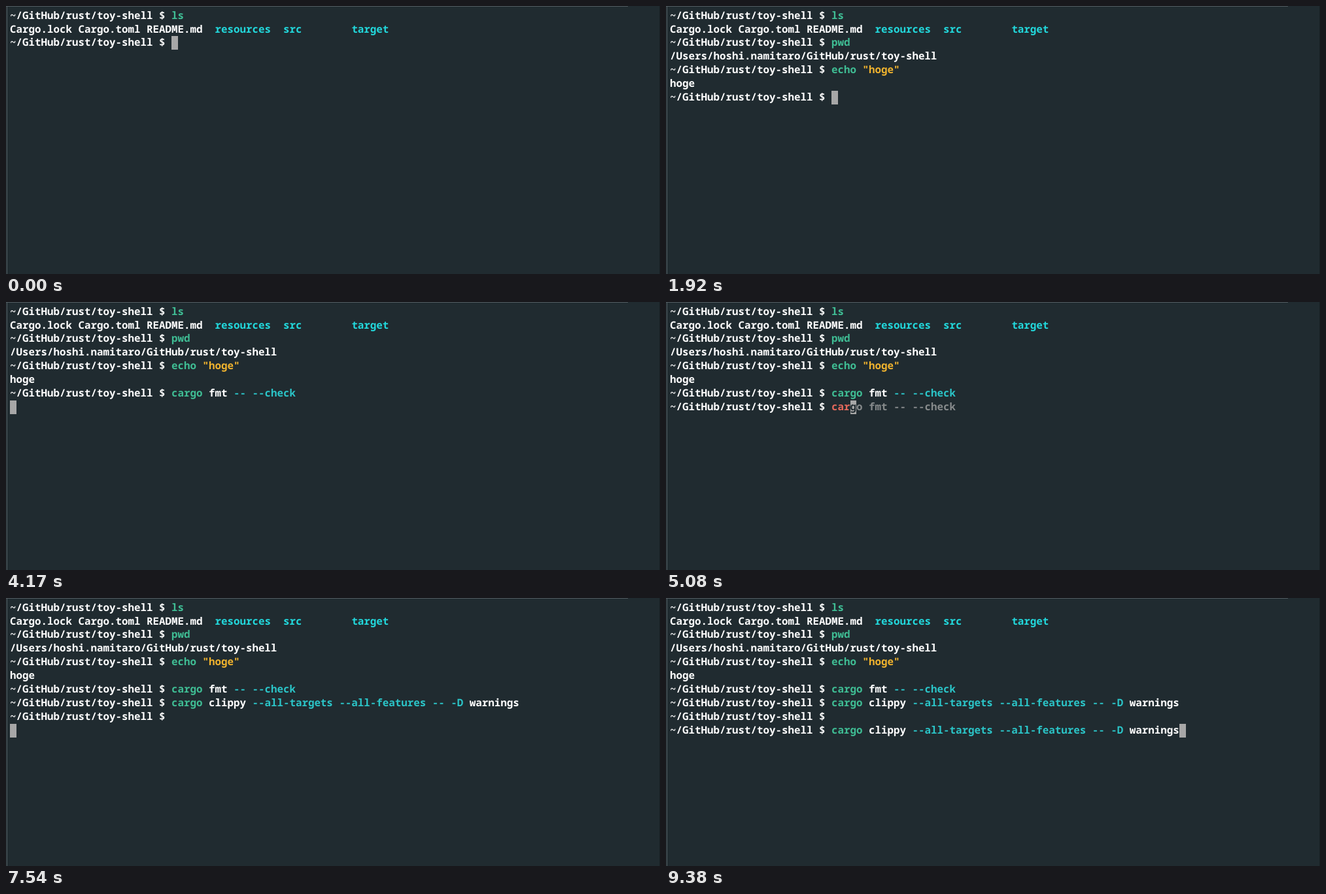
Write an HTML page that moves like this. It is 1000 by 411 pixels and loops after 9430 ms.

```html
<!DOCTYPE html>
<html lang="en">
<head>
<meta charset="utf-8">
<title>toy-shell</title>
<style>
  html, body { margin: 0; width: 100%; height: 100%; overflow: hidden; background: #202b30; }
  #stage { position: relative; width: 1000px; height: 411px; overflow: hidden; background: #202b30; }
  .edge { position: absolute; background: #535d62; }
  .top { left: 0; top: 0; width: 951px; height: 1px; }
  .left { left: 1px; top: 0; width: 1px; height: 411px; }
  .right { right: 0; top: 0; width: 1px; height: 411px; background: #182125; }
  #cursor { position: absolute; width: 9.5px; height: 20.9px; background: #a7a7a7; }
  .row {
    position: absolute; left: 6px; height: 20.9px; white-space: pre; color: #fff;
    font: 600 15.833px/20.9px "Noto Sans Mono", "DejaVu Sans Mono", monospace;
    text-rendering: geometricPrecision; font-variant-ligatures: none;
  }
  .row i { font-style: normal; }
  .cmd { color: #3fbd94; }
  .bad { color: #e4695c; font-weight: 700; }
  .opt { color: #2bc5c8; }
  .dir { color: #22d8dc; font-weight: 700; }
  .str { color: #f0b32e; }
  .ghost { color: #878b8c; }
  .under { color: #202b30; }
</style>
</head>
<body>
<div id="stage">
  <div class="edge top"></div>
  <div class="edge left"></div>
  <div class="edge right"></div>
  <div id="cursor"></div>
</div>
<script>
  const LOOP = 9430, ROWS = 10, TOP = 4.6, PITCH = 20.9, CELL = 9.5;
  const PROMPT = '~/GitHub/rust/toy-shell $ ';

  const paint = cls => text => `<i class="${cls}">${text}</i>`;
  const [cmd, bad, opt, dir, str, ghostText, under] =
    ['cmd', 'bad', 'opt', 'dir', 'str', 'ghost', 'under'].map(paint);
  const width = html => html.replace(/<[^>]*>/g, '').length;

  // Each step sets some rows and moves the cursor.
  const steps = [];
  const step = (at, lines, row, col) => steps.push({ at, lines, row, col });

  const input = (at, row, typed, hint = '') => {
    const tail = hint && under(hint[0]) + ghostText(hint.slice(1));
    step(at, { [row]: PROMPT + typed + tail }, row, PROMPT.length + width(typed));
  };
  const newline = (at, row) => step(at, {}, row, 0);

  // Types a word key by key; it turns valid on its last letter.
  const typeWord = (times, row, word, rest) => times.forEach((at, i) => {
    const part = word.slice(0, i + 1);
    const valid = part === word;
    input(at, row, (valid ? cmd : bad)(part), word.slice(i + 1) + rest);
  });

  const cargo = cmd('cargo') + ' ';
  const format = cargo + 'fmt ' + opt('--') + ' ' + opt('--check');
  const lintTail = 'clippy --all-targets --all-features -- -D warnings';
  const lint = cargo + 'clippy ' + opt('--all-targets') + ' ' + opt('--all-features') +
    ' ' + opt('--') + ' ' + opt('-D') + ' warnings';

  step(0, {
    0: PROMPT + cmd('ls'),
    1: `Cargo.lock Cargo.toml README.md  ${dir('resources')}  ${dir('src')}        ${dir('target')}`
  }, 2, 0);
  input(0, 2, '');
  typeWord([120, 210, 380], 2, 'pwd', '');
  step(520, { 3: '/Users/hoshi.namitaro/GitHub/rust/toy-shell' }, 4, 0);
  input(520, 4, '');
  input(660, 4, bad('e'), 'cho "hoge"');
  input(770, 4, bad('ec'), 'ho "hoge"');
  input(920, 4, cmd('echo') + ' ' + str('"hoge"'));
  step(1380, { 5: 'hoge' }, 6, 0);
  input(1380, 6, '');

  typeWord([2540, 2630, 2750, 2870, 2960], 6, 'cargo', ' run');
  input(3090, 6, cargo, 'run');
  input(3460, 6, cargo + 'f', 'mt -- --check');
  input(3790, 6, format);
  newline(4080, 7);

  input(4420, 7, '');
  typeWord([4790, 4880, 5000, 5090, 5170], 7, 'cargo', ' fmt -- --check');
  input(5290, 7, cargo, 'fmt -- --check');
  [5460, 5620, 5750].forEach((at, i) =>
    input(at, 7, cargo + lintTail.slice(0, i + 1), lintTail.slice(i + 1)));
  input(6210, 7, lint);
  newline(6710, 8);

  input(7040, 8, '');
  newline(7460, 9);
  input(7630, 9, '');
  input(8840, 9, lint);

  const stage = document.getElementById('stage');
  const cursor = document.getElementById('cursor');
  const rows = Array.from({ length: ROWS }, (_, i) => {
    const el = document.createElement('div');
    el.className = 'row';
    el.style.top = TOP - 1 + i * PITCH + 'px';
    return stage.appendChild(el);
  });

  let shown = 0;
  function draw(time) {
    const past = steps.filter(s => s.at <= time);
    if (past.length === shown) return;
    shown = past.length;
    const lines = Object.assign({}, ...past.map(s => s.lines));
    rows.forEach((el, i) => { el.innerHTML = lines[i] || ''; });
    const { row, col } = past[shown - 1];
    cursor.style.left = 6 + col * CELL + 'px';
    cursor.style.top = TOP + row * PITCH + 'px';
  }

  const start = performance.now();
  function tick() {
    draw((performance.now() - start) % LOOP);
    requestAnimationFrame(tick);
  }
  tick();
</script>
</body>
</html>
```
